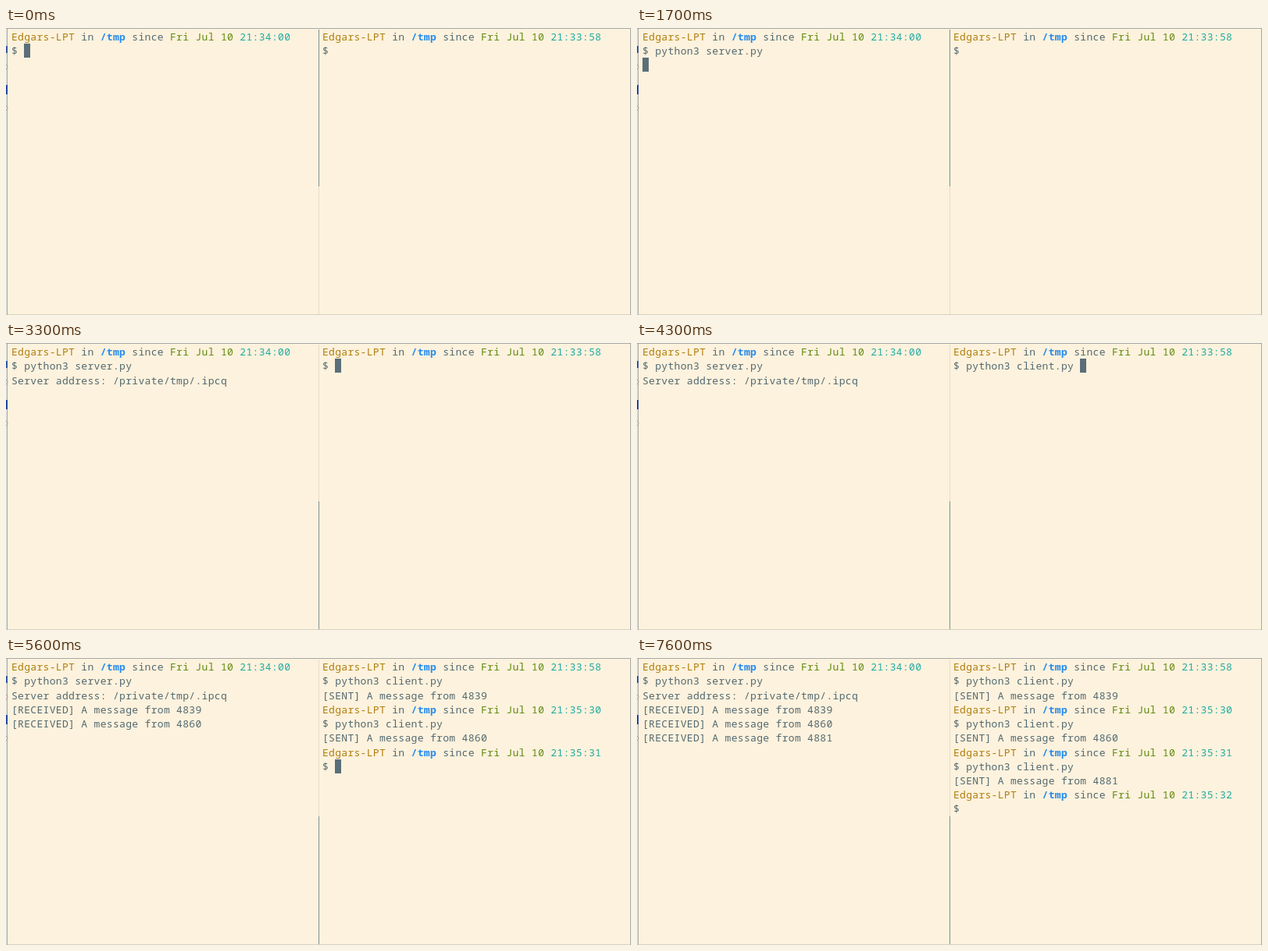
These frames come from a looping animation (800x368 px, 7700 ms). An HTML page with a canvas:

```html
<!DOCTYPE html>
<html lang="en">
<head>
<meta charset="utf-8">
<title>Server and client terminals</title>
<style>
  html, body { margin: 0; width: 100%; height: 100%; overflow: hidden; background: #fdf2dd; }
  canvas { display: block; width: 100vw; height: 100vh; }
</style>
</head>
<body>
<canvas id="stage"></canvas>
<script>
const W = 800, H = 368, LOOP = 7700;
const CELL = 8.12, ROW = 18.22, TOP = 2, BASE = 14.2;
const LEFT = 7, RIGHT = 404.9;
const HOST = 'Edgars-LPT';
const FONT = '13px "Noto Sans Mono", "DejaVu Sans Mono", monospace';
const C = {
  bg: '#fdf2dd', text: '#536870', host: '#b07d0b', path: '#268bec',
  date: '#628a0e', time: '#20aba2', cursor: '#5b6f78',
  edge: '#a5a7a6', pale: '#e5dcc9', active: '#7f9090'
};

// Key presses; the last one completes the file name.
const SERVER_KEYS = [200, 300, 500, 600, 700, 800, 900, 1000, 1100, 1200];
const CLIENT_KEYS = Array.from({ length: 10 }, (_, i) => 3400 + i * 90);
const SWITCH = 2900;
const RUNS = [
  { enter: 4400, done: 4600, pid: 4839, clock: '21:35:30' },
  { recall: 5100, enter: 5300, done: 5500, pid: 4860, clock: '21:35:31' },
  { recall: 6000, enter: 6200, done: 6400, pid: 4881, clock: '21:35:32' }
];
const CURSOR_OFF = [[1300, 1500], [2200, 2700], [6600, 7100], [7600, 7700]];

const canvas = document.getElementById('stage');
const ctx = canvas.getContext('2d');

function resize() {
  const ratio = window.devicePixelRatio || 1;
  canvas.width = Math.round(innerWidth * ratio);
  canvas.height = Math.round(innerHeight * ratio);
}

const plain = s => [[s, C.text]];
const prompt = clock => [
  [HOST, C.host], [' in ', C.text], ['/tmp', C.path, true],
  [' since ', C.text], ['Fri Jul 10 ', C.date], [clock, C.time]
];

function typed(command, keys, t) {
  const count = keys.filter(k => t >= k).length;
  return command.slice(0, count === keys.length ? command.length : count);
}

function serverLines(t) {
  const lines = [prompt('21:34:00'), plain('$ ' + typed('python3 server.py ', SERVER_KEYS, t))];
  if (t >= 1900) lines.push(plain('Server address: /private/tmp/.ipcq'));
  for (const run of RUNS) {
    if (t >= run.done) lines.push(plain('[RECEIVED] A message from ' + run.pid));
  }
  if (t >= 1600) lines.push(plain(''));
  return lines;
}

function clientLines(t) {
  const lines = [prompt('21:33:58')];
  for (const run of RUNS) {
    const command = run.recall
      ? (t >= run.recall ? 'python3 client.py ' : '')
      : typed('python3 client.py ', CLIENT_KEYS, t);
    lines.push(plain('$ ' + command));
    if (t < run.enter) return lines;
    if (t < run.done) return lines.concat([plain('')]);
    lines.push(plain('[SENT] A message from ' + run.pid), prompt(run.clock));
  }
  lines.push(plain('$ '));
  return lines;
}

function rect(x, y, w, h, color) {
  ctx.fillStyle = color;
  ctx.fillRect(x, y, w, h);
}

function drawPane(x, lines, showCursor) {
  let col = 0;
  lines.forEach((line, row) => {
    col = 0;
    for (const [text, color, bold] of line) {
      ctx.font = (bold ? 'bold ' : '') + FONT;
      ctx.fillStyle = color;
      for (const ch of text) ctx.fillText(ch, x + CELL * col++, TOP + ROW * row + BASE);
    }
  });
  if (showCursor) {
    const y = Math.round(TOP + ROW * (lines.length - 1));
    rect(Math.round(x + CELL * col), y, 8, 18, C.cursor);
  }
}

function drawFrame(leftActive) {
  rect(0, 0, W, H, C.bg);
  rect(0, 0, 1, H, '#e9e6e0');
  // Slivers of the window behind
  rect(0, 23, 2, 9, '#3656a0');
  rect(0, 73, 2, 12, '#2446a0');
  ctx.strokeStyle = '#9a9a98';
  ctx.lineWidth = 1;
  for (const y of [50, 103]) {
    ctx.beginPath();
    ctx.arc(-1, y, 3, -1.4, 1.4);
    ctx.stroke();
  }
  rect(1, 0, 1, 23, C.edge);
  rect(1, 32, 1, 41, C.edge);
  rect(1, 85, 1, H - 85, C.edge);
  rect(0, 0, W, 1, C.edge);
  rect(W - 1, 0, 1, H, C.edge);
  rect(2, H - 1, W - 3, 1, '#d8d1c1');
  rect(400, 2, 1, H - 3, C.pale);
  rect(400, leftActive ? 2 : 203, 1, leftActive ? 201 : 164, C.active);
}

function draw(t) {
  const leftActive = t < SWITCH;
  const lit = !CURSOR_OFF.some(([from, to]) => t >= from && t < to);
  ctx.setTransform(canvas.width / W, 0, 0, canvas.height / H, 0, 0);
  drawFrame(leftActive);
  drawPane(LEFT, serverLines(t), lit && leftActive);
  drawPane(RIGHT, clientLines(t), lit && !leftActive);
}

const start = performance.now();
function tick() {
  draw((performance.now() - start) % LOOP);
  requestAnimationFrame(tick);
}

addEventListener('resize', resize);
resize();
tick();
</script>
</body>
</html>
```
